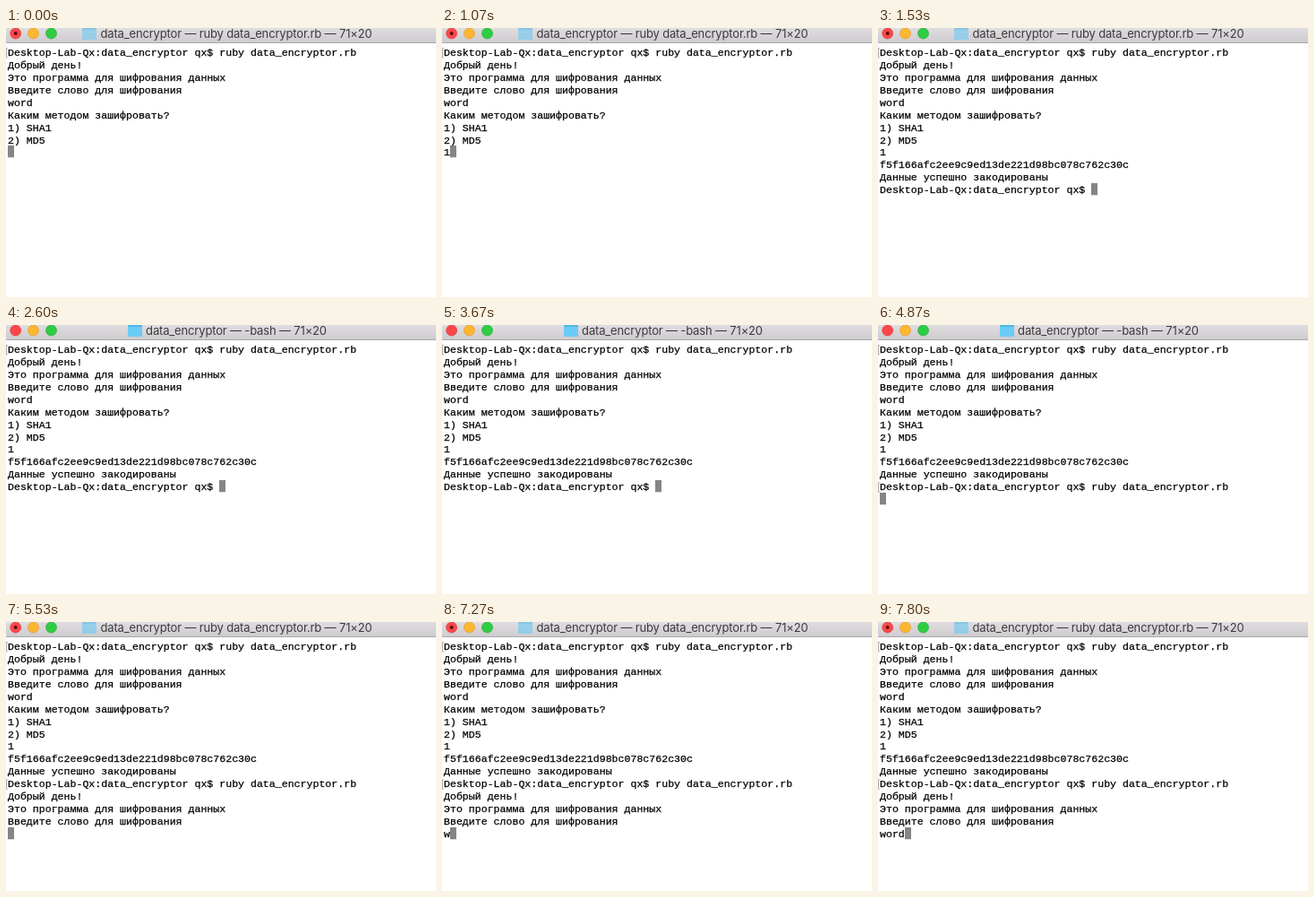
Write an HTML page that moves like this. It is 480 by 300 pixels and loops after 8 s.

```html
<!DOCTYPE html>
<html lang="ru">
<head>
<meta charset="utf-8">
<title>data_encryptor</title>
<style>
  html, body { margin: 0; width: 100%; height: 100%; overflow: hidden; background: #fff; }
  svg { display: block; width: 480px; height: 300px; }
  #title { font: 13px Inter, sans-serif; letter-spacing: -.16px; fill: #3c3a3c; }
  #rows { font: 11.58px "Liberation Mono", monospace; fill: #000; stroke: #000; stroke-width: .25px; }
</style>
</head>
<body>
<svg viewBox="0 0 480 300">
  <defs>
    <linearGradient id="bar" x2="0" y2="1">
      <stop offset="0" stop-color="#e0dde0"/>
      <stop offset="1" stop-color="#cfcccf"/>
    </linearGradient>
  </defs>
  <rect width="480" height="300" fill="#fff"/>
  <rect width="480" height="16" fill="url(#bar)"/>
  <rect y="16" width="480" height="1" fill="#aaa8aa"/>
  <g stroke-width=".7">
    <circle cx="10.7" cy="6" r="6" fill="#fb474b" stroke="#e0403f"/>
    <circle cx="30.5" cy="6" r="6" fill="#fdb630" stroke="#dfa037"/>
    <circle cx="50.5" cy="6" r="6" fill="#2ecd44" stroke="#2dac3d"/>
  </g>
  <circle id="busy" cx="10.7" cy="6" r="2" fill="#5c0d0b"/>
  <g id="folder">
    <rect width="16" height="13" rx="1" fill="#52b5e3"/>
    <rect y="2" width="16" height="11" rx="1" fill="#6bcaf6"/>
  </g>
  <text id="title" x="257" y="11" text-anchor="middle"></text>
  <rect id="cursor" width="7" height="13.3" fill="#858585"/>
  <g id="rows"></g>
  <g id="marks" fill="none" stroke="#aaa"></g>
</svg>
<script>
const LOOP = 8000, LEFT = 2, ADVANCE = 6.95, PITCH = 13.93;
const SVG = "http://www.w3.org/2000/svg";
const $ = id => document.getElementById(id);

const prompt = "Desktop-Lab-Qx:data_encryptor qx$ ";
const command = "ruby data_encryptor.rb";
const greeting = ["Добрый день!", "Это программа для шифрования данных", "Введите слово для шифрования"];
const menu = [prompt + command, ...greeting, "word", "Каким методом зашифровать?", "1) SHA1", "2) MD5"];
const done = [...menu, "1", "f5f166afc2ee9c9ed13de221d98bc078c762c30c", "Данные успешно закодированы"];
const rerun = [...done, prompt + command];
const asking = [...rerun, ...greeting];

// Each step: start time, finished lines, line being typed, program in the title.
const steps = [
  [0, menu, "", true],
  [1070, menu, "1", true],
  [1470, [...menu, "1"], "", true],
  [1530, done, prompt, true],
  [1600, done, prompt, false],
  [4270, done, prompt + command, false],
  [4530, rerun, "", false],
  [4930, asking, "", true],
  [7270, asking, "w", true],
  [7400, asking, "wo", true],
  [7670, asking, "wor", true],
  [7800, asking, "word", true]
];

function add(parent, tag, attrs) {
  const node = document.createElementNS(SVG, tag);
  for (const key in attrs) node.setAttribute(key, attrs[key]);
  return parent.appendChild(node);
}

function show([, lines, input, running]) {
  const row = lines.length;
  $("rows").replaceChildren();
  $("marks").replaceChildren();
  [...lines, input].forEach((line, i) => {
    const y = 31 + i * PITCH;
    add($("rows"), "text", { x: LEFT, y }).textContent = line;
    if (i < row && line.startsWith(prompt))
      add($("marks"), "path", { d: `M2 ${y - 8.5}H.5v10.5H2` });
  });
  $("cursor").setAttribute("x", Math.round(LEFT + input.length * ADVANCE));
  $("cursor").setAttribute("y", 19 + row * 14);
  $("title").textContent = `data_encryptor — ${running ? command : "-bash"} — 71×20`;
  $("busy").setAttribute("visibility", running ? "visible" : "hidden");
  $("folder").setAttribute("transform", `translate(${running ? 85 : 136} 0)`);
  $("folder").setAttribute("opacity", running ? .6 : 1);
}

let current;
function frame(now) {
  const time = now % LOOP;
  const step = steps.findLast(([start]) => start <= time);
  if (step !== current) show(current = step);
  requestAnimationFrame(frame);
}
show(current = steps[0]);
requestAnimationFrame(frame);
</script>
</body>
</html>
```
